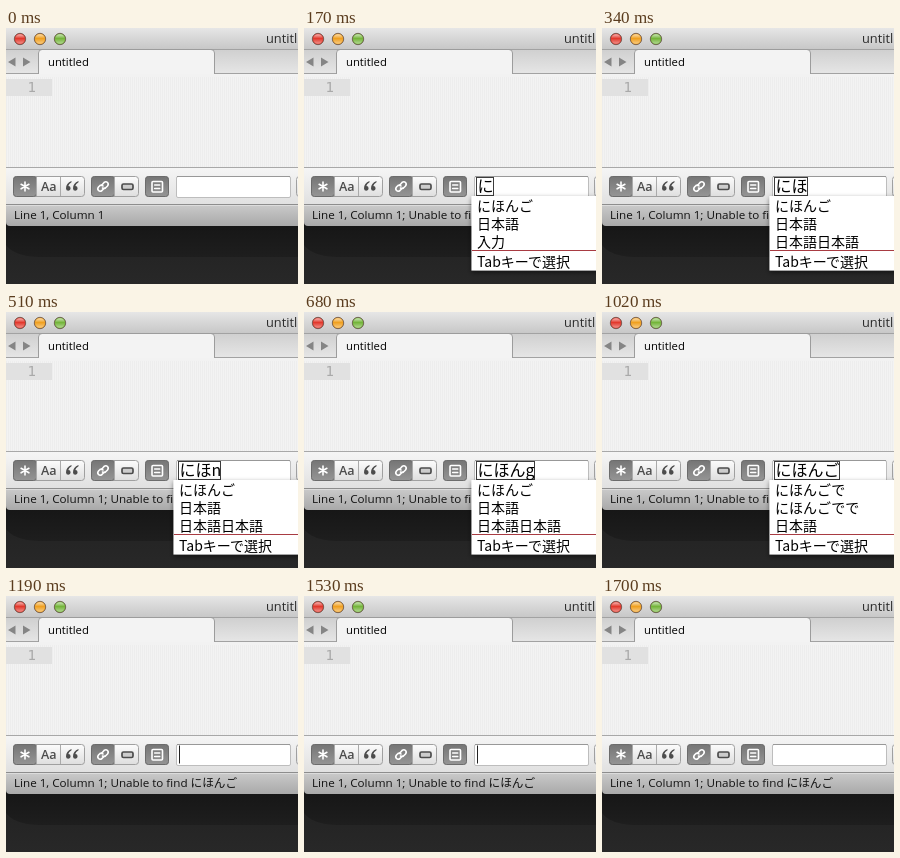
An HTML page for the animation above (1870 ms loop, 292 px wide and 256 px high).

```html
<!DOCTYPE html>
<html lang="ja">
<head>
<meta charset="utf-8">
<title>Input method in a find panel</title>
<style>
  html, body { margin: 0; width: 100%; height: 100%; overflow: hidden; background: #222; }
  svg { display: block; width: 100vw; height: 100vh; }
  text { font-family: "Open Sans", "Noto Sans CJK JP", "Noto Sans CJK", sans-serif; font-weight: 500; fill: #111; white-space: pre; }
  .status { font-size: 11.65px; }
  .typed { font-size: 16px; fill: #000; }
  .list text { font-size: 14px; fill: #000; }
  .list text, .typed { font-family: "Noto Sans CJK JP", "Noto Sans CJK", sans-serif; }
  .number { font: 14px "DejaVu Sans Mono", monospace; fill: #a9a9a9; }
  .icon { fill: none; stroke: #fff; stroke-width: 1.6; stroke-linecap: round; }
</style>
</head>
<body>
<svg viewBox="0 0 292 256" preserveAspectRatio="none">
  <defs>
    <linearGradient id="desk" x2="0" y2="1"><stop stop-color="#212121"/><stop offset="1" stop-color="#282828"/></linearGradient>
    <linearGradient id="shade" x2="0" y2="1"><stop stop-color="#161616"/><stop offset="1" stop-color="#1e1e1e"/></linearGradient>
    <linearGradient id="title" x2="0" y2="1"><stop stop-color="#e6e6e6"/><stop offset="1" stop-color="#c6c6c6"/></linearGradient>
    <linearGradient id="tabs" x2="0" y2="1"><stop stop-color="#cfcfcf"/><stop offset="1" stop-color="#e6e6e6"/></linearGradient>
    <linearGradient id="panel" x2="0" y2="1"><stop stop-color="#f5f5f5"/><stop offset="1" stop-color="#e0e0e0"/></linearGradient>
    <linearGradient id="bar" x2="0" y2="1"><stop stop-color="#cbcbcb"/><stop offset="1" stop-color="#a9a9a9"/></linearGradient>
    <linearGradient id="light" x2="0" y2="1"><stop stop-color="#fcfcfc"/><stop offset="1" stop-color="#dedede"/></linearGradient>
    <linearGradient id="dark" x2="0" y2="1"><stop stop-color="#757575"/><stop offset="1" stop-color="#959595"/></linearGradient>
    <linearGradient id="gloss" x2="0" y2="1"><stop stop-color="#fff" stop-opacity=".65"/><stop offset=".45" stop-color="#fff" stop-opacity="0"/><stop offset="1" stop-color="#fff" stop-opacity=".45"/></linearGradient>
    <pattern id="stripes" width="2" height="2" patternUnits="userSpaceOnUse">
      <path fill="#f3f3f3" d="M0 0h2v2H0z"/><path fill="#ededed" d="M0 0h1v2H0z"/>
    </pattern>
    <filter id="shadow" x="-10%" y="-15%" width="120%" height="140%">
      <feDropShadow dx="0" dy="2" stdDeviation="2.5" flood-opacity=".5"/>
    </filter>
  </defs>

  <rect y="196" width="292" height="60" fill="url(#desk)"/>
  <path d="M0 196H292V229H32Q8 228 0 217Z" fill="url(#shade)"/>

  <!-- Title and tabs -->
  <rect width="292" height="22" fill="url(#title)"/>
  <g id="lights"></g>
  <text x="260" y="15" font-size="12.8" style="fill:#2a2a2a">untitled</text>
  <rect y="21" width="292" height="25" fill="url(#tabs)"/>
  <rect y="46" width="292" height="3" fill="#f2f2f2"/>
  <path d="M0 21.5H292M0 45.5H292" stroke="#a2a2a2"/>
  <path d="M32 46.5V25Q32.500 22 35 22H206Q208.500 22 208.500 25V46.500Z" fill="#f3f3f3"/>
  <path d="M32.500 46V25Q32.500 21.500 36 21.500H205Q208.500 21.500 208.500 25V46" fill="none" stroke="#9c9c9c"/>
  <path d="M9.500 29.500v9l-7.500-4.500zM17 29.500v9l7.500-4.500z" fill="#858585"/>
  <text x="42" y="38" font-size="11.3" style="fill:#000">untitled</text>

  <!-- Editor -->
  <rect y="49" width="292" height="91" fill="url(#stripes)"/>
  <rect y="51" width="46" height="17" fill="#e1e1e1"/>
  <text class="number" x="21.5" y="64">1</text>

  <!-- Find panel -->
  <rect y="140" width="292" height="37" fill="url(#panel)"/>
  <path d="M0 139.500H292" stroke="#a8a8a8"/>
  <g id="buttons"></g>
  <path class="icon" d="M19 154v9M15.1 156.3l7.8 4.5M22.900 156.300l-7.800 4.500"/>
  <text x="35" y="163" font-size="12.5" style="fill:#4c4c4c;font-weight:600">Aa</text>
  <path id="quotes" d="M65.500 153q-5.500 2-5.500 7.500a2.300 2.300 0 1 0 2.300-2.400q.5-2.500 3.200-3.900zM72.500 153q-5.500 2-5.500 7.500a2.300 2.300 0 1 0 2.300-2.400q.5-2.500 3.200-3.900z" fill="#4c4c4c"/>
  <path class="icon" d="M95.500 157.500l2.500-3q2-1.500 3.500 0t0 3.500l-2 2q-1.500 1-3 0M98.500 160l-2.500 2.500q-2 1.500-3.500 0t0-3.500l1.500-1.500q1.500-1 3 .5"/>
  <rect x="116" y="156" width="11" height="5.500" rx="1.5" fill="#ccc" stroke="#4c4c4c" stroke-width="1.7"/>
  <rect class="icon" x="146" y="153.500" width="10.500" height="10.500" rx="1"/>
  <path class="icon" d="M148.700 157h5M148.700 160.500h5"/>
  <rect x="170.5" y="148.5" width="114" height="21" rx="1.5" fill="#fff" stroke="#bdbdbd"/>
  <path d="M171 148.5h113" stroke="#989898"/>
  <rect x="290.5" y="148.5" width="20" height="20" rx="3" fill="url(#light)" stroke="#a0a0a0"/>

  <!-- Status bar -->
  <path d="M0 176H292V198H4Q0 198 0 194Z" fill="url(#bar)"/>
  <path d="M0 176.5H292" stroke="#8d8d8d"/>
  <path d="M0 177.5H292" stroke="#dcdcdc"/>
  <text class="status" id="status" x="8" y="191.3"></text>

  <rect id="outline" x="172.5" y="149.5" height="18" fill="none" stroke="#3c3c3c"/>
  <text class="typed" id="typed" x="173.5" y="163.7"></text>
  <path id="caret" d="M173.5 149.5v18" stroke="#222"/>

  <g class="list" id="list">
    <rect x="167.5" y="168" width="140" height="74.5" fill="#fff" filter="url(#shadow)"/>
    <text x="173" y="183"></text>
    <text x="173" y="201"></text>
    <text x="173" y="219"></text>
    <path d="M168 222.5H292" stroke="#a83b42"/>
    <text x="173" y="239">Tabキーで選択</text>
  </g>
</svg>
<script>
const $ = id => document.getElementById(id);
const LOOP = 1870, STEP = 170;

$("lights").innerHTML = ["#e2382c", "#f0a020", "#74b53a"].map((color, i) => {
  const x = 14 + 20 * i;
  return `<circle cx="${x}" cy="11" r="5.7" fill="${color}" stroke="#5f4a42" stroke-opacity=".75"/>
    <circle cx="${x}" cy="11" r="4.8" fill="url(#gloss)"/>`;
}).join("");

// Each group: left edge and number of buttons; the first one is pressed.
$("buttons").innerHTML = [[7, 3], [85, 2], [139, 1]].map(([x, count]) => {
  const frame = (buttons, fill, stroke) =>
    `<rect x="${x + .5}" y="148.5" width="${24 * buttons - 1}" height="20" rx="3" fill="${fill}" stroke="${stroke}"/>`;
  const dividers = Array.from({ length: count - 1 }, (_, i) => `M${x + 24 * (i + 1) - .5} 149v19`).join("");
  return frame(count, "url(#light)", "#a0a0a0") + frame(1, "url(#dark)", "#6c6c6c") +
    `<path d="${dividers}" stroke="#aaa"/>`;
}).join("");

const early = ["にほんご", "日本語", "入力"];
const middle = ["にほんご", "日本語", "日本語日本語"];
const late = ["にほんごで", "にほんごでで", "日本語"];
const typing = [
  ["に", early], ["にほ", middle], ["にほn", middle],
  ["にほんg", middle], ["にほんご", middle], ["にほんご", late]
];
const rows = $("list").querySelectorAll("text");
const show = (id, visible) => $(id).style.display = visible ? "" : "none";

function render(step) {
  const entry = typing[step - 1];
  const [typed, words] = entry || ["", ["", "", ""]];
  const query = typed || "にほんご";
  $("status").textContent = "Line 1, Column 1" + (step ? "; Unable to find " + query : "");
  $("typed").textContent = typed;
  const width = [...typed].reduce((sum, c) => sum + (c < "\u0080" ? 9 : 16), 1);
  $("outline").setAttribute("width", width);
  words.forEach((word, i) => rows[i].textContent = word);
  show("list", entry);
  show("outline", entry);
  show("caret", step >= 7 && step < 10);
}

let shown = -1;
function tick() {
  const step = Math.floor(performance.now() % LOOP / STEP);
  if (step !== shown) render(shown = step);
  requestAnimationFrame(tick);
}
tick();
</script>
</body>
</html>
```
